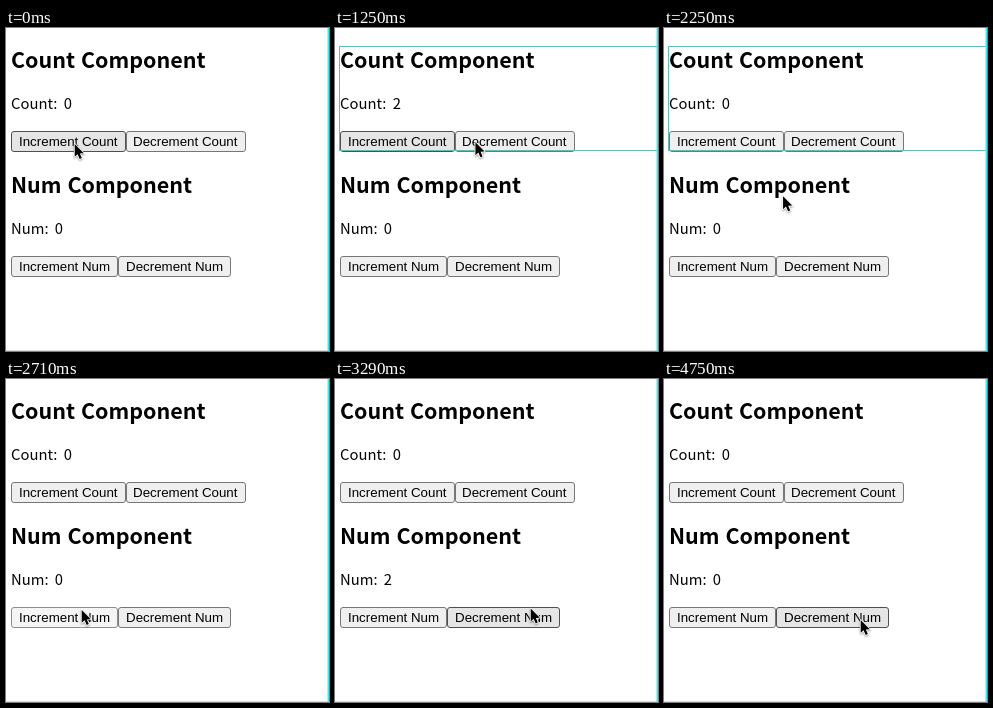
These frames come from a looping animation (323x323 px, 5.11 s). An HTML page with a canvas:

```html
<!DOCTYPE html>
<html lang="en">
<head>
<meta charset="utf-8">
<title>Counter components</title>
<style>
  html, body { margin: 0; width: 100%; height: 100%; overflow: hidden; background: #fff; }
  canvas { display: block; width: 323px; height: 323px; }
</style>
</head>
<body>
<canvas id="stage"></canvas>
<script>
const SIZE = 323, LOOP = 5110;
const PRESS = 50, FLASH = 250, HOVER_LAG = 80;

const canvas = document.getElementById('stage');
const ctx = canvas.getContext('2d');
const ratio = window.devicePixelRatio || 1;
canvas.width = canvas.height = Math.round(SIZE * ratio);

const SANS = '"Noto Sans CJK KR", "Noto Sans CJK JP", "Noto Sans CJK SC", "Noto Sans CJK", "Noto Sans", sans-serif';
const UI = '13.333px "Liberation Sans", Arial, sans-serif';

// Times at which each click takes effect: two increments, then two decrements.
const COMPONENTS = [
  { name: 'Count', top: 18, clicks: [460, 1040, 1630, 2040] },
  { name: 'Num', top: 143, clicks: [2750, 2960, 3750, 4040] }
];
const PRESSES = COMPONENTS.flatMap(c => c.clicks);

const HOME = { x: 68, y: 115 };
const MOVES = [
  { from: 1080, to: 1380, x: 156, y: 113 },
  { from: 2090, to: 2690, x: 75, y: 230 },
  { from: 3170, to: 3290, x: 195, y: 228.5 },
  { from: 3290, to: 3670, x: 196, y: 240 }
];

const easeOut = k => 1 - (1 - k) ** 2;

function pointerAt(t) {
  let { x, y } = HOME;
  for (const move of MOVES) {
    const k = (t - move.from) / (move.to - move.from);
    const e = easeOut(Math.min(1, Math.max(0, k)));
    x += (move.x - x) * e;
    y += (move.y - y) * e;
  }
  return { x, y };
}

function text(str, x, y, font) {
  ctx.font = font;
  ctx.fillStyle = '#000';
  ctx.fillText(str, x, y);
}

// Draws a button as wide as its label needs and returns its right edge.
function button(label, x, y, hover, pressed) {
  ctx.font = UI;
  const end = x + ctx.measureText(label).width + 16;
  const left = Math.round(x), right = Math.round(end);
  const hot = hover.x >= left && hover.x < right && hover.y >= y && hover.y < y + 21;
  const [fill, edge] = !hot ? ['#efefef', '#767676']
    : pressed ? ['#f5f5f5', '#8d8d8d'] : ['#e5e5e5', '#4f4f4f'];

  ctx.beginPath();
  ctx.roundRect(left + 0.5, y + 0.5, right - left - 1, 20, 2.5);
  ctx.fillStyle = fill;
  ctx.fill();
  ctx.strokeStyle = edge;
  ctx.lineWidth = 1;
  ctx.stroke();
  text(label, Math.floor(x + 8), y + 15, UI);
  return end;
}

function component({ name, top, clicks }, t, hover, pressed) {
  const done = clicks.filter(c => c <= t).length;
  const value = 2 - Math.abs(2 - done);

  ctx.wordSpacing = '1px';
  text(name + ' Component', 5, top + 22, 'bold 21.5px ' + SANS);
  ctx.wordSpacing = '3px';
  text(`${name}: ${value}`, 5, top + 63, '14.8px ' + SANS);
  ctx.wordSpacing = '0px';

  const next = button('Increment ' + name, 5, top + 85, hover, pressed);
  button('Decrement ' + name, next, top + 85, hover, pressed);

  if (clicks.some(c => t >= c && t < c + FLASH)) {
    ctx.strokeStyle = '#62bdb4';
    ctx.strokeRect(4.5, top + 0.5, SIZE, 104);
  }
}

function pointer({ x, y }) {
  ctx.save();
  ctx.translate(x + 0.7, y + 1);
  ctx.scale(0.83, 0.83);
  const arrow = new Path2D('M0 0V15.5L3.5 12.3L6 18L8.6 16.9L6.2 11.3L11 11.1Z');
  ctx.lineJoin = 'round';
  ctx.lineWidth = 2;
  ctx.strokeStyle = '#fff';
  ctx.shadowColor = 'rgba(0,0,0,.4)';
  ctx.shadowBlur = 2 * ratio;
  ctx.shadowOffsetY = ratio;
  ctx.stroke(arrow);
  ctx.shadowColor = 'transparent';
  ctx.fillStyle = '#000';
  ctx.fill(arrow);
  ctx.restore();
}

function draw(t) {
  ctx.setTransform(ratio, 0, 0, ratio, 0, 0);
  ctx.fillStyle = '#fff';
  ctx.fillRect(0, 0, SIZE, SIZE);
  ctx.fillStyle = '#dcdcdc';
  ctx.fillRect(0, 322, SIZE, 1);

  const hover = pointerAt(t - HOVER_LAG);
  const pressed = PRESSES.some(c => t >= c - PRESS && t < c);
  COMPONENTS.forEach(c => component(c, t, hover, pressed));

  ctx.fillStyle = '#25f3fb';
  ctx.fillRect(321.5, 0, 1.5, SIZE);
  pointer(pointerAt(t));
}

const start = performance.now();
function frame() {
  draw((performance.now() - start) % LOOP);
  requestAnimationFrame(frame);
}
frame();
</script>
</body>
</html>
```
